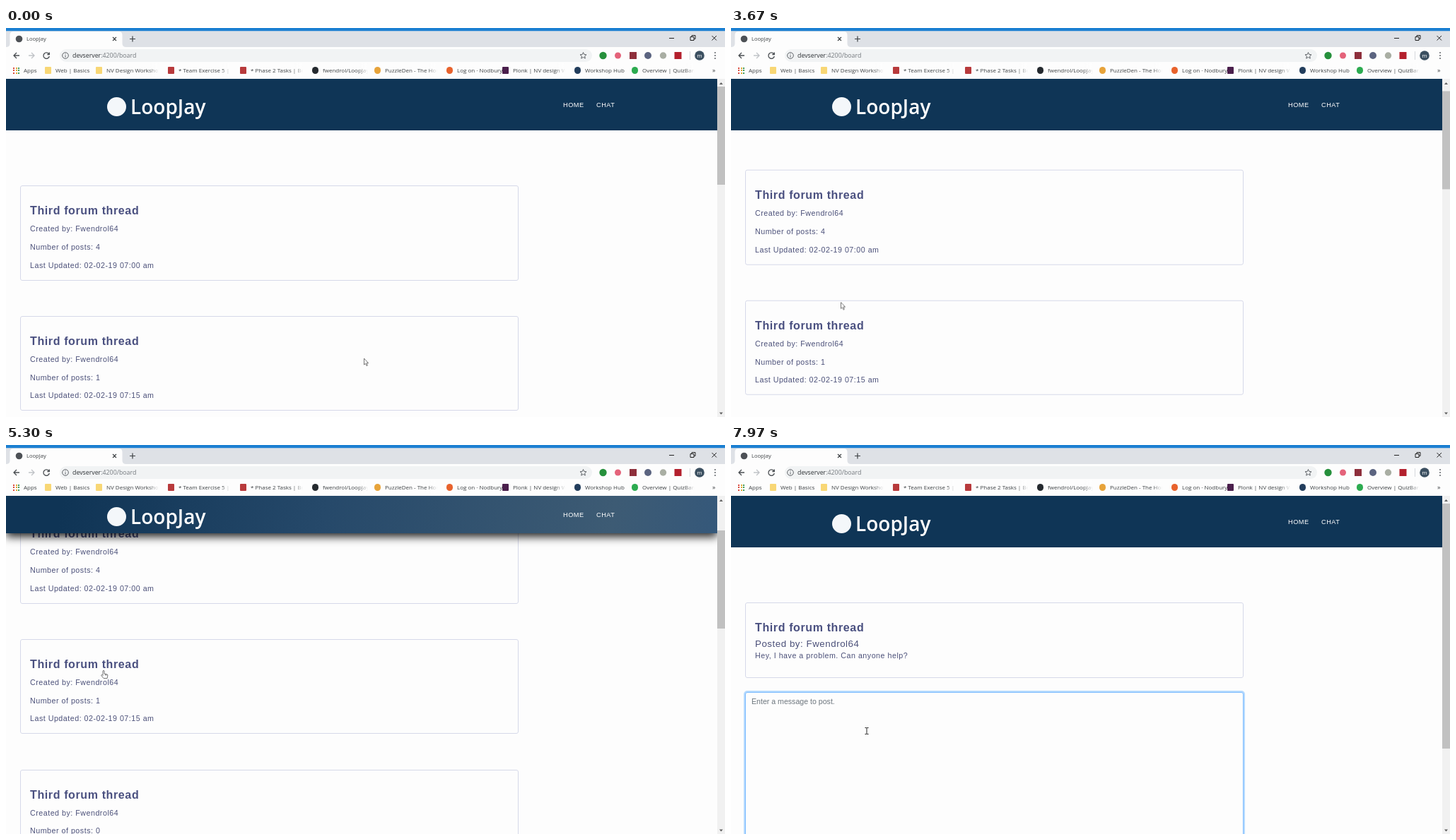
These frames come from a looping animation (1017x551 px, 8000 ms). An HTML page:

```html
<!DOCTYPE html>
<html lang="en">
<head>
<meta charset="utf-8">
<title>LoopJay</title>
<style>
html, body { margin: 0; width: 100%; height: 100%; overflow: hidden; background: #fdfdfd; }
.stage { position: relative; width: 1017px; height: 551px; overflow: hidden; background: #fdfdfd;
  font-family: "Liberation Sans", Arial, sans-serif; color: #4b5079; }
.stage div, .stage svg, .stage span { position: absolute; box-sizing: border-box; white-space: nowrap; }
.layer { left: 0; top: 0; width: 1017px; height: 551px; }
.anim { animation: 8s linear infinite; }
.step { animation: 8s step-end infinite; }

/* page content */
.card { left: 20px; width: 704.5px; border: 1px solid #d6d9e9; border-radius: 3px; }
.line { left: 13px; line-height: 20px; font-size: 10.67px; letter-spacing: .52px; }
.head { font-size: 16px; font-weight: bold; letter-spacing: .62px; color: #4a5080; }
.by { font-size: 13.33px; letter-spacing: .53px; }
.box { left: 20px; top: 350px; width: 704.5px; height: 240px; border: 1px solid #cdd2e4; border-radius: 3px;
  color: #6c757d; font-size: 10.6px; line-height: 24px; padding-left: 8px; background: #fdfdfd; animation-name: focus; }
.btn { top: 590px; height: 25.5px; line-height: 25.5px; border-radius: 3px; color: #fff; font-size: 10.67px; text-align: center; }
.forum { animation-name: forum; }
.thread { animation-name: thread; }
.forum-on { animation-name: forumOn; }
.thread-on { animation-name: threadOn; }

/* site header */
.bar { left: 0; top: 72px; width: 1006px; height: 73px; background: #0f3556; animation-name: bar; }
.tint { left: 0; top: 0; width: 100%; height: 100%; opacity: 0; animation-name: tint;
  background: linear-gradient(100deg, #0f3455 8%, #26496a 45%, #3d5b74 85%, #35587a); }
.mid { left: 0; top: 50%; width: 100%; height: 0; color: #fff; }
.mark { left: 143px; top: -11px; width: 27px; height: 27px; border-radius: 50%; background: #f4f7fa; }
.word { left: 176px; top: -18px; line-height: 40px; font: 600 28px/40px "Open Sans", "Noto Sans", sans-serif; }
.link { top: -10px; font-size: 9.2px; line-height: 20px; letter-spacing: .5px; }

/* browser frame */
.frame { left: 0; top: 0; width: 1017px; height: 72px; background: #fdfdfd;
  font-family: "Open Sans", "Noto Sans", sans-serif; color: #3c4043; }
.mark-text { top: 50px; height: 20px; line-height: 20px; font-size: 8px; overflow: hidden; }
.fade::after { content: ""; position: absolute; right: 0; top: 0; width: 14px; height: 20px;
  background: linear-gradient(90deg, #fdfdfd00, #fdfdfd); }
.track { left: 1006px; top: 72px; width: 11px; height: 479px; background: #f1f1f1; }
.thumb { left: 0; top: 11px; width: 11px; height: 139px; background: #c1c1c1; animation-name: thumb; }

/* pointer */
.pointer { left: 0; top: 0; width: 0; height: 0; animation-name: move; }
.pointer svg { overflow: visible; left: 0; top: 0; width: 1px; height: 1px; }
.arrow { animation-name: arrow; }
.hand { animation-name: hand; }
.beam { animation-name: beam; }

@keyframes forum {
  0%, 45.6% { transform: none; }
  48.375%, 51.9% { transform: translateY(-215px); }
  54.4%, 100% { transform: translateY(-133px); }
}
@keyframes thread {
  0%, 79.6% { transform: none; }
  80.5% { transform: translateY(-127px); }
  81%, 82.5% { transform: translateY(-133px); }
  84%, 100% { transform: none; }
}
@keyframes thumb {
  0%, 45.6% { transform: none; height: 139px; }
  48.375%, 51.9% { transform: translateY(62px); height: 139px; }
  54.4%, 72.5% { transform: translateY(38px); height: 139px; }
  72.51%, 79.6% { transform: none; height: 347px; }
  80.5% { transform: translateY(92px); height: 347px; }
  81%, 82.5% { transform: translateY(96px); height: 347px; }
  84%, 100% { transform: none; height: 347px; }
}
@keyframes bar {
  0%, 46.25% { height: 73px; box-shadow: 0 0 0 #0000; }
  48.375% { height: 60.5px; box-shadow: 0 2px 6px #0008; }
  50.5% { height: 54px; box-shadow: 0 4px 11px #000b; }
  52.5%, 72.5% { height: 53px; box-shadow: 0 5px 12px #000d; }
  75% { height: 60px; box-shadow: 0 2px 6px #0008; }
  78.5%, 80.5% { height: 73px; box-shadow: 0 0 0 #0000; }
  82.7% { height: 61px; box-shadow: 0 2px 6px #0008; }
  88.5%, 100% { height: 73px; box-shadow: 0 0 0 #0000; }
}
@keyframes tint {
  0% { opacity: 0; }
  46.25% { opacity: 1; }
  72.5% { opacity: 0; }
  80.2% { opacity: 1; }
  83.5%, 100% { opacity: 0; }
}
@keyframes forumOn { 0% { visibility: visible; } 72.5%, 100% { visibility: hidden; } }
@keyframes threadOn { 0% { visibility: hidden; } 72.5%, 100% { visibility: visible; } }
@keyframes focus {
  0%, 95% { border-color: #cdd2e4; box-shadow: 0 0 0 0 #007bff00; }
  97%, 100% { border-color: #80bdff; box-shadow: 0 0 0 2px #4aa5ff66; }
}
@keyframes move {
  0%, 6.6% { transform: translate(506px, 468px); animation-timing-function: ease-in-out; }
  16.6% { transform: translate(145px, 412px); }
  20.4%, 27.1% { transform: translate(139px, 417px); }
  33.5%, 42% { transform: translate(127px, 432px); }
  47% { transform: translate(163px, 376px); }
  52% { transform: translate(163px, 376px); animation-timing-function: ease-in-out; }
  60%, 73% { transform: translate(138px, 319px); animation-timing-function: ease-in-out; }
  78.5%, 84% { transform: translate(268px, 319px); animation-timing-function: ease-in-out; }
  93%, 100% { transform: translate(192px, 405px); }
}
@keyframes arrow {
  0% { visibility: visible; }
  31% { visibility: hidden; }
  44.5% { visibility: visible; }
  58% { visibility: hidden; }
  73% { visibility: visible; }
  80%, 100% { visibility: hidden; }
}
@keyframes hand {
  0% { visibility: hidden; }
  31% { visibility: visible; }
  44.5% { visibility: hidden; }
  58% { visibility: visible; }
  73%, 100% { visibility: hidden; }
}
@keyframes beam { 0% { visibility: hidden; } 80%, 100% { visibility: visible; } }
</style>
</head>
<body>
<div class="stage">
  <div class="layer step forum-on"><div class="layer anim forum" id="forum"></div></div>

  <div class="layer step thread-on"><div class="layer anim thread">
    <div class="card" style="top:223px;height:106.5px">
      <span class="line head" style="top:25px">Third forum thread</span>
      <span class="line by" style="top:47.5px">Posted by: Fwendrol64</span>
      <span class="line" style="top:63.5px">Hey, I have a problem. Can anyone help?</span>
    </div>
    <div class="box anim">Enter a message to post.</div>
    <div class="btn" style="left:20px;width:66px;background:#68727a">GO BACK</div>
    <div class="btn" style="left:640px;width:84.5px;background:#7ad089">Post Message</div>
  </div></div>

  <div class="bar anim">
    <div class="tint step"></div>
    <div class="mid">
      <div class="mark"></div>
      <span class="word">LoopJay</span>
      <span class="link" style="left:788px">HOME</span>
      <span class="link" style="left:835px">CHAT</span>
    </div>
  </div>

  <div class="frame" id="frame">
    <svg class="layer" style="height:72px" viewBox="0 0 1017 72" fill="none" stroke="#5f6368" font-family="Open Sans, Noto Sans, sans-serif">
      <g stroke="none">
        <path fill="#dee1e6" d="M0 0H1017V27H0z"/>
        <path fill="#1c80d2" d="M0 0H1017V4.3H0z"/>
        <path fill="#fdfdfd" d="M0 27q5.500 0 5.500-5V10q0-5 5-5H159.500q5 0 5 5v12q0 5 5.500 5z"/>
        <rect x="76" y="30" width="753" height="18" rx="9" fill="#f1f3f4"/>
        <circle cx="18.500" cy="15.500" r="4.800" fill="#4d5156"/>
        <text x="29" y="18.300" font-size="7.600" fill="#3c4043">LoopJay</text>
        <text x="94" y="42" font-size="8.800" fill="#2f3337">devserver<tspan fill="#74797e">:4200/board</tspan></text>
        <g fill="#5f6368"><circle cx="1003" cy="35" r="1"/><circle cx="1003" cy="39" r="1"/><circle cx="1003" cy="43" r="1"/></g>
        <circle cx="844.500" cy="39" r="5.200" fill="#26903c"/>
        <circle cx="865.500" cy="39" r="4.500" fill="#e4637a"/>
        <rect x="882" y="34" width="10" height="10" fill="#8e2f3c"/>
        <circle cx="908" cy="39" r="5" fill="#5b6480"/>
        <circle cx="929.500" cy="39" r="4.700" fill="#a9aea3"/>
        <rect x="945.500" y="34" width="10" height="10" fill="#b3202d"/>
        <circle cx="981" cy="39" r="6.800" fill="#3b4f60"/>
        <text x="981" y="41.600" font-size="8" fill="#fff" text-anchor="middle">m</text>
        <text x="999" y="62.500" font-size="9" fill="#3c4043">»</text>
      </g>
      <path d="M151 13l5 5m0-5l-5 5M179 11.500v8m-4-4h8" stroke="#3c4043" stroke-width="1.200"/>
      <path d="M938 14.500h7M968 12.500h5v5h-5zM970 12.500v-2h5v5h-2M998.500 11l6.500 6.500m0-6.500l-6.500 6.500" stroke="#222"/>
      <path d="M19 39h-8m4-4l-4 4 4 4" stroke="#4a4e52" stroke-width="1.300"/>
      <path d="M32 39h8m-4-4l4 4-4 4" stroke="#c0c3c7" stroke-width="1.300"/>
      <path d="M60.500 36.500a4.200 4.200 0 1 0 .8 3.500M61.300 34.500v3h-3" stroke="#4a4e52" stroke-width="1.300"/>
      <circle cx="84" cy="39" r="4.300"/><path d="M84 38.500v3M84 36.300v1"/>
      <path d="M816.500 34.500l1.300 3 3.200.3-2.400 2.100.7 3.200-2.800-1.700-2.800 1.700.7-3.200-2.400-2.100 3.200-.3z"/>
      <path d="M967.500 33v12" stroke="#d5d8dc"/>
    </svg>
  </div>

  <div class="track">
    <div class="thumb anim"></div>
    <svg class="layer" style="width:11px;height:479px" viewBox="0 0 11 479" fill="#606060">
      <path d="M3 8l2.500-3 2.500 3zM3 472.500l2.500 3 2.500-3z"/>
    </svg>
  </div>

  <div class="pointer anim">
    <svg class="arrow step"><path d="M.5 0v9l2-1.800 1.500 3.300 1.400-.6-1.500-3.200h2.700z" fill="#fff" stroke="#555" stroke-width=".8"/></svg>
    <svg class="hand step"><path d="M-1 1q1-1.400 2 0v4l4 .9q1 .3 .9 1.400l-.8 4.200h-5l-3.300-4q0-1.300 1.300-.9l.9 .9zM2.500 5.500v2M4.200 6v1.600" fill="#fff" stroke="#555" stroke-width=".8"/></svg>
    <svg class="beam step"><path d="M-2.500-4.500h2l.5.5.5-.5h2M0-4v8M-2.500 4.500h2l.5-.5.5.5h2" fill="none" stroke="#222"/></svg>
  </div>
</div>

<script>
const add = (parent, tag, cls, css, text = "") => {
  const el = document.createElement(tag);
  el.className = cls;
  el.style.cssText = css;
  el.textContent = text;
  parent.append(el);
  return el;
};

const forum = document.getElementById("forum");
[[4, "02-02-19 07:00 am"], [1, "02-02-19 07:15 am"], [0, "30-01-19 04:44 pm"]].forEach(([posts, date], i) => {
  const card = add(forum, "div", "card", `top:${223 + i * 184.75}px;height:134.5px`);
  add(card, "span", "line head", "top:25px", "Third forum thread");
  ["Created by: Fwendrol64", "Number of posts: " + posts, "Last Updated: " + date].forEach((text, n) =>
    add(card, "span", "line", `top:${50 + n * 25.75}px`, text));
});

const frame = document.getElementById("frame");
const dots = ["#d9473a", "#e0a92e", "#3f9b58", "#4580dc"];
for (let i = 0; i < 9; i++) {
  add(frame, "div", "", `left:${10 + i % 3 * 3.5}px;top:${55.5 + (i / 3 | 0) * 3.5}px;width:2.3px;height:2.3px;background:${dots[(i + (i / 3 | 0)) % 4]}`);
}

// text x, clip width (0 = free), label, icon colour, icon radius
const folder = "#f8d775";
[
  [25, 0, "Apps"],
  [70, 0, "Web | Basics", folder, "1px"],
  [142, 74, "NV Design Workshop", folder, "1px"],
  [244, 74, "* Team Exercise 5 | Board", "#b83a3c", "1px"],
  [346, 74, "* Phase 2 Tasks | Boards", "#b83a3c", "1px"],
  [448, 64, "fwendrol/LoopJay", "#24292e", "50%"],
  [536, 74, "PuzzleDen - The Home of", "#e7a33a", "50%"],
  [638, 0, "Log on · Nodbury", "#e8622c", "50%"],
  [717, 74, "Plonk | NV design Works", "#4a1f4c", "1px"],
  [819, 0, "Workshop Hub", "#223d5c", "50%"],
  [900, 74, "Overview | QuizBarn", "#2cab50", "50%"]
].forEach(([x, width, label, color, radius]) => {
  add(frame, "span", width ? "mark-text fade" : "mark-text", `left:${x}px;` + (width ? `width:${width}px` : ""), label);
  if (color) add(frame, "div", "", `left:${x - 15.5}px;top:55px;width:9.5px;height:9.5px;border-radius:${radius};background:${color}`);
});
</script>
</body>
</html>
```
